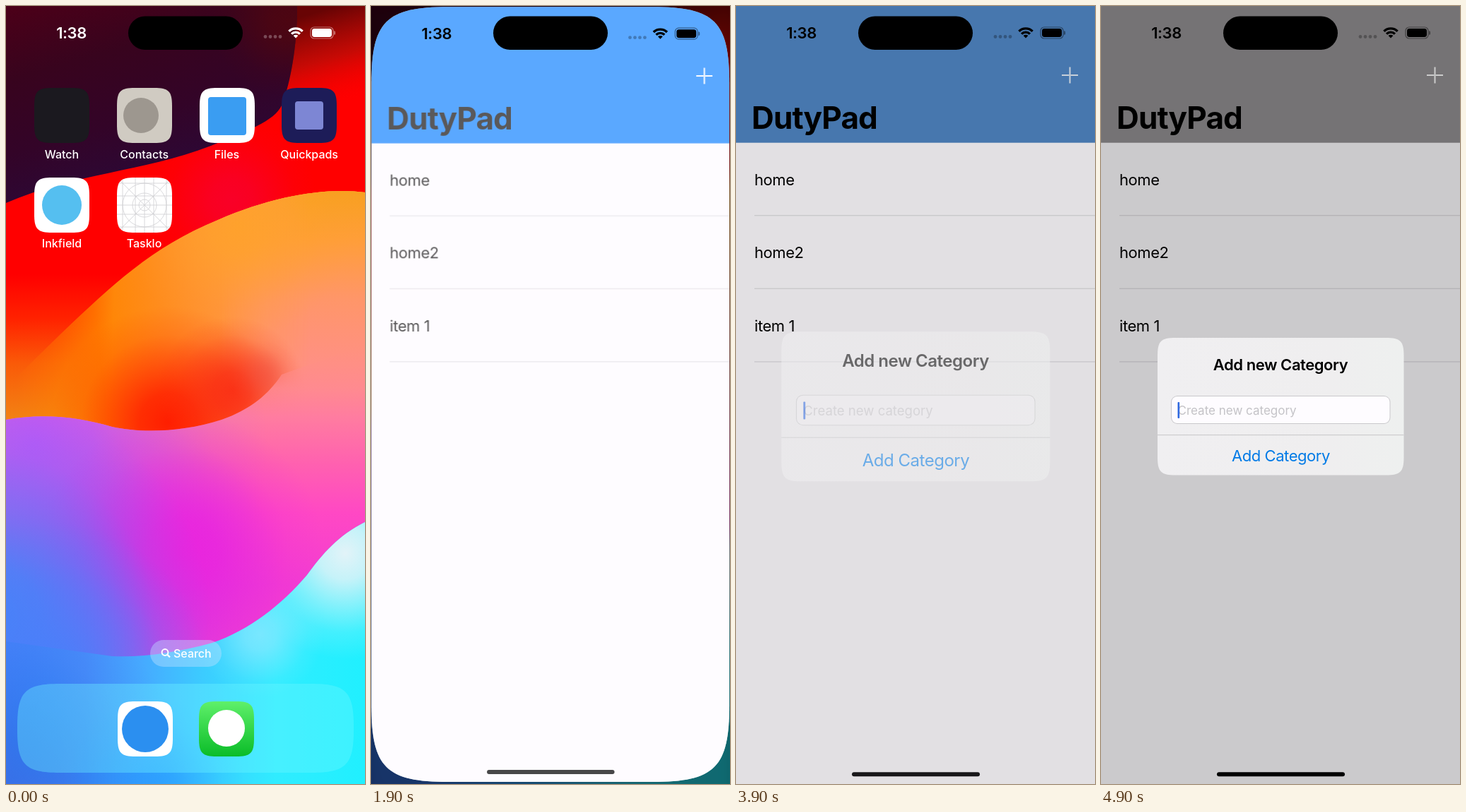
Animation, 508 px wide and 1102 px high, one loop 5000 ms. Source, as an HTML page with a canvas:

```html
<!DOCTYPE html>
<html lang="en">
<head>
<meta charset="utf-8">
<title>Task list demo</title>
<style>
html, body { margin: 0; width: 508px; height: 1102px; overflow: hidden; background: #000; }
canvas { display: block; }
</style>
</head>
<body>
<canvas id="stage" width="508" height="1102"></canvas>
<script>
const W = 508, H = 1102, LOOP = 5000, STEP = 100;
const PAPER = '#fefcff', BLUE = [0, 122, 255], GRAY = [146, 144, 146];
const APP_NAME = 'DutyPad';
const screen = document.getElementById('stage').getContext('2d');

const clamp = v => Math.max(0, Math.min(1, v));
const mix = (a, b, p) => a + (b - a) * p;
const smooth = v => { v = clamp(v); return v * v * (3 - 2 * v); };
const rgb = (a, b, p) => `rgb(${a.map((v, i) => Math.round(mix(v, b[i], p)))})`;

function layer(paint) {
  const c = document.createElement('canvas');
  c.width = W;
  c.height = H;
  paint(c.getContext('2d'));
  return c;
}

function rounded(g, x, y, w, h, r, fill) {
  g.beginPath();
  g.roundRect(x, y, w, h, r);
  g.fillStyle = fill;
  g.fill();
}

function disc(g, x, y, r, fill) {
  g.beginPath();
  g.arc(x, y, r, 0, 7);
  g.fillStyle = fill;
  g.fill();
}

function text(g, str, x, y, size, weight, fill, align = 'left') {
  g.font = `${weight} ${size}px Inter, "Liberation Sans", sans-serif`;
  g.letterSpacing = size > 20 ? -0.02 * size + 'px' : '0px';
  g.textAlign = align;
  g.fillStyle = fill;
  g.fillText(str, x, y);
}

function line(g, x1, y1, x2, y2, width, color) {
  g.beginPath();
  g.moveTo(x1, y1);
  g.lineTo(x2, y2);
  g.lineWidth = width;
  g.strokeStyle = color;
  g.stroke();
}

// Rectangle with continuous-curvature corners
function squircle(g, x, y, w, h, r) {
  const e = 1.5 * r, c = 0.28 * r, X = x + w, Y = y + h;
  g.beginPath();
  g.moveTo(x + e, y);
  g.lineTo(X - e, y);
  g.bezierCurveTo(X - c, y, X, y + c, X, y + e);
  g.lineTo(X, Y - e);
  g.bezierCurveTo(X, Y - c, X - c, Y, X - e, Y);
  g.lineTo(x + e, Y);
  g.bezierCurveTo(x + c, Y, x, Y - c, x, Y - e);
  g.lineTo(x, y + e);
  g.bezierCurveTo(x, y + c, x + c, y, x + e, y);
  g.closePath();
}

function linear(g, x1, y1, x2, y2, stops) {
  const f = g.createLinearGradient(x1, y1, x2, y2);
  stops.forEach(([at, color]) => f.addColorStop(at, color));
  return f;
}

// Soft round patch of one colour, given as "r,g,b"
function blob(g, x, y, r, color, alpha = 1) {
  const f = g.createRadialGradient(x, y, 0, x, y, r);
  [1, 0.85, 0.5, 0.16, 0].forEach((a, i) => f.addColorStop(i / 4, `rgba(${color},${a * alpha})`));
  g.fillStyle = f;
  g.fillRect(0, 0, W, H);
}

function inside(g, path, paint) {
  g.save();
  g.clip(new Path2D(path));
  paint();
  g.restore();
}

function fillAll(g, fill) {
  g.fillStyle = fill;
  g.fillRect(0, 0, W, H);
}

function paintWallpaper(g) {
  // Red and dark top
  fillAll(g, linear(g, 0, 380, 0, 590, [[0, '#ff0000'], [0.3, '#ff2200'], [0.6, '#fa5a08'], [1, '#f28414']]));
  blob(g, 320, 275, 120, '246,0,56', 0.7);
  fillAll(g, linear(g, 470, 0, 508, 130, [[0, 'rgba(104,4,4,1)'], [0.5, 'rgba(184,12,6,.8)'], [1, 'rgba(255,0,0,0)']]));
  inside(g, 'M0 279C100 236 190 236 290 198C350 174 385 160 392 136C402 108 412 60 412 0H0Z', () => {
    fillAll(g, linear(g, 0, 0, 80, 280, [[0, '#4c0018'], [0.35, '#38041e'], [0.7, '#330428'], [1, '#2c0836']]));
    blob(g, 400, 20, 110, '82,6,14', 0.8);
  });

  // Orange wave
  inside(g, 'M508 264C455 257 380 268 300 303C205 342 150 396 80 462L0 540V640H508Z', () => {
    const warm = [[0, '#f8a020'], [0.18, '#ff9e38'], [0.4, '#ff9668'], [0.65, '#ff9084'], [1, '#ff7ca0']];
    g.save();
    fillAll(g, linear(g, 15, 500, 150, 505, [[0, 'rgba(255,132,0,0)'], [1, 'rgba(255,132,0,1)']]));
    fillAll(g, linear(g, 130, 470, 370, 440, [[0, 'rgba(255,156,72,0)'], [1, 'rgba(255,152,84,1)']]));
    g.beginPath();
    g.rect(330, 250, 178, 400);
    const side = layer(s => {
      fillAll(s, linear(s, 0, 262, 0, 640, warm));
      s.globalCompositeOperation = 'destination-in';
      fillAll(s, linear(s, 300, 0, 430, 0, [[0, 'rgba(0,0,0,0)'], [1, '#000']]));
    });
    g.drawImage(side, 0, 0);
    g.restore();
    blob(g, 330, 310, 160, '255,163,40', 0.85);
    blob(g, 230, 590, 165, '255,30,0');
    blob(g, 320, 545, 105, '250,44,20', 0.9);
    blob(g, 366, 522, 48, '240,80,64', 0.5);
  });

  // Pink and violet wave
  inside(g, 'M0 586C55 576 105 583 150 596C190 605 250 604 305 586C345 572 372 550 390 522L508 480V1102H0Z', () => {
    fillAll(g, linear(g, 0, 480, 0, 820, [[0, 'rgba(255,144,128,0)'], [0.18, 'rgba(255,138,144,.9)'],
      [0.3, '#ff7ca0'], [0.5, '#ff60b0'], [0.7, '#ff48c4'], [1, '#f23cd2']]));
    blob(g, 40, 620, 330, '190,86,246');
    blob(g, 150, 820, 240, '176,70,240', 0.9);
    blob(g, 250, 775, 200, '234,36,222');
    blob(g, -30, 870, 320, '66,134,248');
    blob(g, 60, 960, 230, '72,128,250');
  });

  // Cyan foot
  inside(g, 'M508 731C470 750 448 776 426 806C390 848 345 884 292 902C240 916 195 923 150 921L0 900V1102H508Z', () => {
    fillAll(g, linear(g, 0, 0, W, 0, [[0, 'rgba(62,134,248,.2)'], [0.22, '#4a8cfa'], [0.38, '#46aaff'],
      [0.55, '#3cccff'], [0.75, '#30ecff'], [1, '#20f0ff']]));
    blob(g, 480, 775, 150, '226,243,248');
    blob(g, 360, 890, 90, '150,232,255', 0.7);
    blob(g, 0, 1102, 260, '32,116,232', 0.8);
    blob(g, 210, 1110, 130, '32,150,255', 0.6);
  });
}

function tile(g, x, y, fill) {
  squircle(g, x, y, 78, 78, 17);
  g.fillStyle = fill;
  g.fill();
}

function gridIcon(g, x, y) {
  g.save();
  tile(g, x, y, '#fff');
  g.clip();
  g.translate(x + 39, y + 39);
  const tone = '#cfcfd2';
  for (const d of [-31, -13, 0, 13, 31]) {
    line(g, d, -39, d, 39, 0.8, tone);
    line(g, -39, d, 39, d, 0.8, tone);
  }
  line(g, -39, -39, 39, 39, 0.8, tone);
  line(g, -39, 39, 39, -39, 0.8, tone);
  for (const r of [8, 17, 31]) {
    g.beginPath();
    g.arc(0, 0, r, 0, 7);
    g.stroke();
  }
  g.restore();
}

function paintIcons(g) {
  const label = (str, x, y) => text(g, str, x, y, 16, 500, '#fff', 'center');
  tile(g, 40, 116, '#1b191f');
  tile(g, 157, 116, '#d0cbc2');
  disc(g, 191, 155, 25, '#9d978f');
  tile(g, 274, 116, '#fff');
  rounded(g, 286, 129, 54, 54, 4, '#3a9df2');
  tile(g, 390, 116, '#1d1c58');
  rounded(g, 409, 135, 40, 40, 4, '#7d86d4');
  tile(g, 40, 243, '#fff');
  disc(g, 79, 282, 28, '#55bff0');
  gridIcon(g, 157, 243);
  ['Watch', 'Contacts', 'Files', 'Quickpads'].forEach((s, i) => label(s, 79 + i * 116.7, 215.5));
  label('Inkfield', 79, 342);
  label('Tasklo', 195.5, 342);

  rounded(g, 204, 898, 101, 38, 19, 'rgba(190,225,255,.42)');
  g.beginPath();
  g.arc(225, 915.5, 4.4, 0, 7);
  g.lineWidth = 2;
  g.strokeStyle = '#fff';
  g.stroke();
  line(g, 228.2, 918.7, 232, 922.4, 2.2, '#fff');
  text(g, 'Search', 237, 922.5, 16, 500, '#fff');

  squircle(g, 16, 960, 476, 126, 40);
  g.fillStyle = 'rgba(112,246,255,.36)';
  g.fill();
  tile(g, 158, 985, '#fff');
  disc(g, 197, 1024, 33, '#2b8ff0');
  tile(g, 273, 985, linear(g, 0, 985, 0, 1063, [[0, '#5ff06a'], [1, '#0abc28']]));
  disc(g, 312, 1023, 26, '#fff');
}

function statusBar(g, color) {
  text(g, '1:38', 92.5, 46, 22, 600, color, 'center');
  const soft = g.globalAlpha;
  g.globalAlpha = soft * 0.28;
  for (let i = 0; i < 4; i++) disc(g, 367 + i * 7, 43.5, 2.4, color);
  g.globalAlpha = soft * 0.45;
  g.beginPath();
  g.roundRect(431, 30, 32, 16, 5);
  g.lineWidth = 1.2;
  g.strokeStyle = color;
  g.stroke();
  rounded(g, 464.2, 35.3, 1.8, 5.4, [0, 1.5, 1.5, 0], color);
  g.globalAlpha = soft;
  rounded(g, 433, 32, 28, 12, 3.4, color);
  g.strokeStyle = color;
  for (const [r, w] of [[13.6, 3.4], [8.4, 3.3], [2.4, 4.8]]) {
    g.beginPath();
    g.arc(410, 45.5, r, -Math.PI * 0.75, -Math.PI * 0.25);
    g.lineWidth = w;
    g.stroke();
  }
}

function paintApp(g, header, plus) {
  fillAll(g, PAPER);
  g.fillStyle = header;
  g.fillRect(0, 0, W, 193.7);
  const ink = `rgba(255,255,255,${plus})`;
  g.fillStyle = ink;
  g.fillRect(461, 97, 10.5, 2);
  g.fillRect(473.5, 97, 10.5, 2);
  g.fillRect(471.5, 86.5, 2, 23);
  text(g, APP_NAME, 22, 174, 44, 700, '#000');
  ['home', 'home2', 'item 1'].forEach((s, i) => {
    text(g, s, 26, 253.7 + i * 103.6, 22, 400, '#000');
    g.fillStyle = '#e2e0e4';
    g.fillRect(26, 296 + i * 103.6, W - 26, 1.4);
  });
}

function island(g) {
  rounded(g, 173, 14.5, 162, 47.5, 23.7, '#000');
}

const wallpaper = layer(paintWallpaper);
const icons = layer(paintIcons);
const appView = layer(g => paintApp(g, rgb(BLUE, BLUE, 0), 1));

function zoomed(g, img, s) {
  g.drawImage(img, W / 2 * (1 - s), H / 2 * (1 - s), W * s, H * s);
}

function drawHome(g) {
  g.drawImage(wallpaper, 0, 0);
  g.drawImage(icons, 0, 0);
  statusBar(g, '#fff');
}

function drawLaunch(g, t) {
  const left = Math.exp(-(t - 1500) / 84);
  g.filter = `blur(${mix(12, 6, left)}px)`;
  zoomed(g, wallpaper, 1.06);
  zoomed(g, icons, mix(0.955, 0.968, left));
  g.filter = 'none';
  fillAll(g, `rgba(0,0,0,${mix(0.56, 0.29, left)})`);
  g.globalAlpha = 0.87 * left;
  statusBar(g, '#fff');
  g.globalAlpha = 1;

  const x = 59 * left, y = 150.5 * left;
  const w = W - 162 * left, h = H - 503 * left, s = w / W;
  g.save();
  squircle(g, x, y, w, h, mix(73, 60, left));
  g.fillStyle = PAPER;
  g.fill();
  g.clip();
  g.translate(x, y);
  g.scale(s, s);
  g.globalAlpha = smooth((t - 1660) / 400);
  g.drawImage(appView, 0, 0);
  g.globalAlpha = 1;
  statusBar(g, '#000');
  g.globalAlpha = mix(0.72, 0.3, left);
  rounded(g, 164, h / s - 17, 181, 6, 3, '#000');
  g.restore();
}

function caretAlpha(t) {
  const fade = clamp((4650 - t) / 200), back = clamp((t - 4700) / 200);
  return Math.max(fade, back);
}

function drawAlert(g, t, p) {
  g.save();
  g.globalAlpha = p;
  g.translate(254.2, 567.2);
  g.scale(mix(1.2, 1, p), mix(1.2, 1, p));
  g.translate(-254.2, -567.2);
  squircle(g, 80, 470, 348.5, 194.5, 17);
  g.fillStyle = linear(g, 80, 0, 428, 0, [[0, '#f0eff1'], [0.7, '#efeeef'], [1, '#eef0ef']]);
  g.fill();
  text(g, 'Add new Category', 254, 516, 22, 600, '#000', 'center');
  rounded(g, 99, 552, 310.5, 40, 9, '#c9c8cb');
  rounded(g, 100, 553, 308.5, 38, 8, PAPER);
  text(g, 'Create new category', 108.5, 578.5, 17, 400, '#c4c3c7');
  g.fillStyle = '#cdccce';
  g.fillRect(80, 607, 348.5, 1.2);
  text(g, 'Add Category', 254.5, 644.7, 22, 400, '#007ae6', 'center');
  g.globalAlpha = p * caretAlpha(t);
  rounded(g, 108.5, 561, 2.6, 23, 1, '#3069e0');
  g.restore();
}

function drawApp(g, t) {
  const k = Math.max(0, t - 3780) * 0.0153;
  const p = 1 - (1 + k) * Math.exp(-k);
  const plus = t < 3700 ? 1 : mix(0.3, 1, clamp((t - 3750) / 200));
  paintApp(g, rgb(BLUE, GRAY, p), plus);
  fillAll(g, `rgba(0,0,0,${0.2 * p})`);
  statusBar(g, '#000');
  rounded(g, 164, 1085.3, 181, 6, 3, rgb([88, 86, 92], [0, 0, 0], smooth(p * 1.2)));
  if (p > 0) drawAlert(g, t, p);
}

function frame(now) {
  const t = Math.floor((now % LOOP) / STEP) * STEP;
  const scene = t < 1500 ? drawHome : t < 2200 ? drawLaunch : drawApp;
  scene(screen, t);
  island(screen);
  requestAnimationFrame(tick);
}

let start;
function tick(now) {
  start ??= now;
  frame(now - start);
}
requestAnimationFrame(tick);
</script>
</body>
</html>
```
